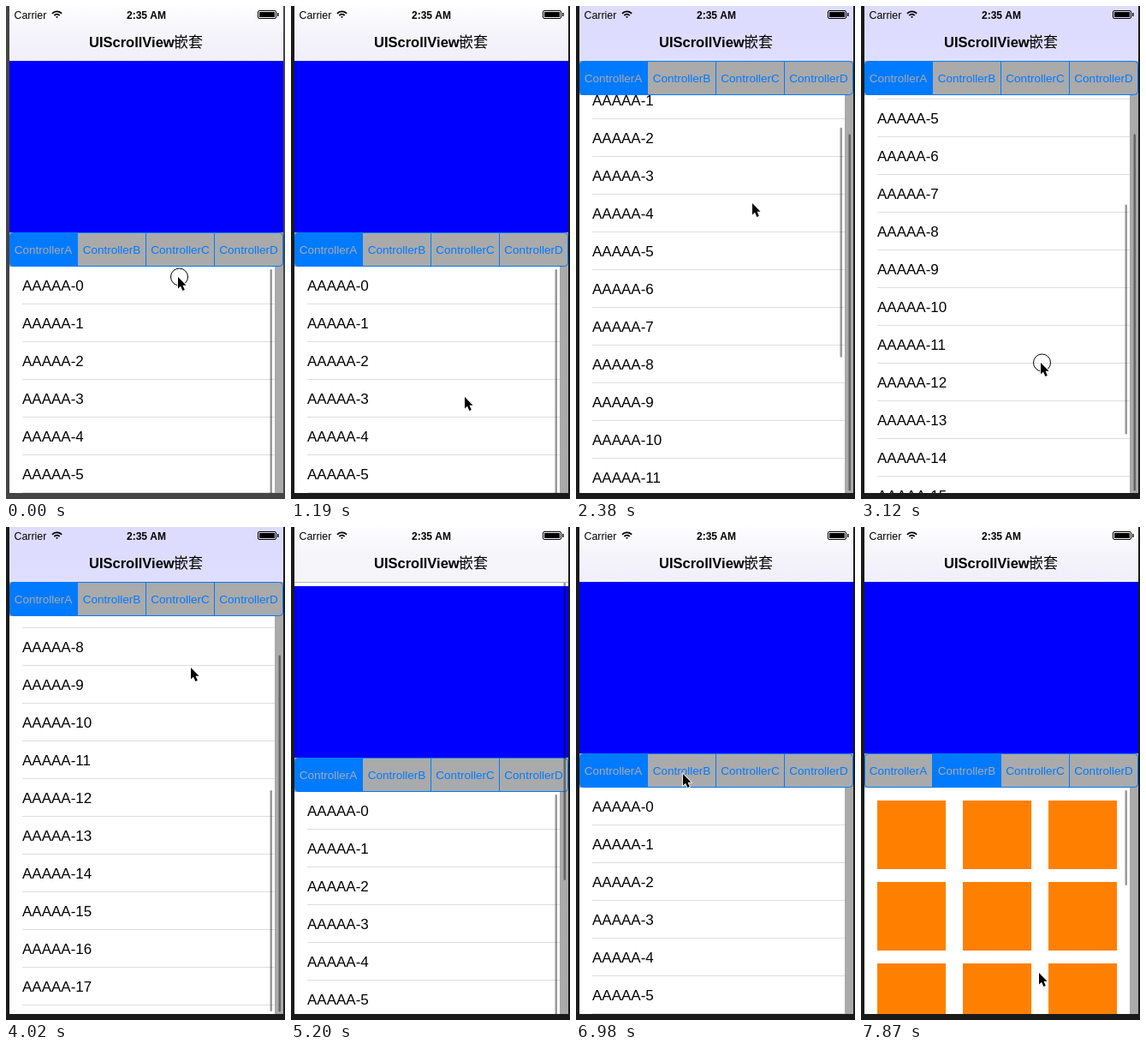
These frames come from a looping animation (326 px wide and 575 px high, 8000 ms). An HTML page with a canvas:

```html
<!DOCTYPE html>
<html lang="en">
<head>
<meta charset="utf-8">
<title>Nested scroll views</title>
<style>
  html, body { margin: 0; width: 100%; height: 100%; overflow: hidden; background: #1a1a1a; }
  canvas { display: block; }
</style>
</head>
<body>
<canvas id="stage" width="326" height="575"></canvas>
<script>
const ctx = document.getElementById('stage').getContext('2d');
const LOOP = 8000, STEP = 148.3;
const SANS = '"Liberation Sans", Arial, sans-serif';
const TINT = '#007aff', GRAY = '#aaa';
const LEFT = 4, WIDTH = 320, BOTTOM = 568, NAV = 64, HEADER = 200, TABS = 40;
const ROW = 44, ROWS = 18, LIST_MAX = 328, TAB_SWITCH = 49;

const cursorTrack = [
  [0, 201, 316], [3, 202, 400], [7, 203, 455], [9, 203, 457], [12, 202, 350],
  [14, 204, 257], [16, 206, 230], [19, 210, 525], [21, 210, 416], [25, 216, 170],
  [27, 216, 164], [29, 216, 180], [33, 214, 540], [35, 212, 590], [37, 208, 590],
  [41, 193, 400], [47, 125, 288], [49, 125, 284], [53, 208, 520]
];
const outerTrack = [
  [9, 0], [12, 107], [14.5, 200], [32, 200], [35, -5], [36, -28],
  [37, -18], [38, -8], [39, -3], [40, -1], [41, 0]
];
const innerTrack = [
  [14.5, 0], [16, 60], [18, 100], [19, 100], [21, 215], [23, 328], [25, 370],
  [26, 350], [27, 338], [28, 330], [29, 328], [32, 0]
];
const pressSpans = [[0, 3], [9, 16], [19, 25], [29, 33]];

const clamp = (v, lo = 0, hi = 1) => Math.min(hi, Math.max(lo, v));

function sample(track, step) {
  const next = track.findIndex(key => key[0] > step);
  if (next === 0) return track[0].slice(1);
  if (next < 0) return track[track.length - 1].slice(1);
  const a = track[next - 1], b = track[next];
  const k = (step - a[0]) / (b[0] - a[0]);
  return a.slice(1).map((v, i) => v + (b[i + 1] - v) * k);
}

function rect(x, y, w, h, color) {
  ctx.fillStyle = color;
  ctx.fillRect(x, y, w, h);
}

function text(str, x, y, font, color = '#000', align = 'left') {
  ctx.font = font;
  ctx.fillStyle = color;
  ctx.textAlign = align;
  ctx.fillText(str, x, y);
}

function indicator(x, top, bottom, alpha) {
  if (alpha <= 0) return;
  ctx.fillStyle = `rgba(0,0,0,${0.4 * alpha})`;
  ctx.beginPath();
  ctx.roundRect(x, top, 2.5, bottom - top, 1.25);
  ctx.fill();
}

function clipped(x, y, w, h, draw) {
  ctx.save();
  ctx.beginPath();
  ctx.rect(x, y, w, h);
  ctx.clip();
  draw();
  ctx.restore();
}

function drawList(top, offset) {
  for (let i = 0; i < ROWS; i++) {
    const y = top + i * ROW - offset;
    text('AAAAA-' + i, 19, y + 28, '17px ' + SANS);
    rect(19, Math.round(y) + ROW - 1, 295, 1, '#dedee0');
  }
}

function drawGrid(top) {
  for (let i = 0; i < 9; i++)
    rect(19 + i % 3 * 100, top + 15 + Math.floor(i / 3) * 95, 80, 80, '#ff8000');
}

function drawTabs(y, selected) {
  rect(LEFT, y, WIDTH, TABS, GRAY);
  ctx.save();
  ctx.beginPath();
  ctx.roundRect(LEFT + 0.5, y + 0.5, WIDTH - 1, TABS - 1, 4);
  ctx.save();
  ctx.clip();
  rect(LEFT + selected * 80 - (selected ? 1 : 0), y, selected ? 81 : 80, TABS, TINT);
  for (let i = 1; i < 4; i++) rect(LEFT + i * 80 - 1, y, 1, TABS, TINT);
  ctx.restore();
  ctx.strokeStyle = TINT;
  ctx.lineWidth = 1;
  ctx.stroke();
  ctx.restore();
  [...'ABCD'].forEach((letter, i) =>
    text('Controller' + letter, 43.5 + i * 80, y + 25, '13.5px ' + SANS,
      i === selected ? GRAY : TINT, 'center'));
}

function drawStatus() {
  text('Carrier', 9.5, 15, '12.4px ' + SANS);
  text('2:35 AM', 164, 15, 'bold 12px ' + SANS, '#000', 'center');
  ctx.strokeStyle = '#000';
  ctx.lineWidth = 1.8;
  for (const r of [1, 4.3, 7.6]) {
    ctx.beginPath();
    ctx.arc(59.5, 14, r, -Math.PI * 0.76, -Math.PI * 0.24);
    ctx.stroke();
  }
  ctx.lineWidth = 1;
  ctx.beginPath();
  ctx.roundRect(294.5, 5.5, 21, 9, 1.5);
  ctx.stroke();
  rect(296, 7, 18, 6, '#000');
  rect(317, 8, 1.5, 4, '#000');
}

function drawNav(outer) {
  const k = clamp(outer / 64);
  const mix = (a, b) => `rgb(${a.map((v, i) => v + (b[i] - v) * k)})`;
  const fill = ctx.createLinearGradient(0, 0, 0, NAV);
  fill.addColorStop(0, mix([254, 254, 255], [221, 220, 255]));
  fill.addColorStop(0.45, mix([246, 245, 250], [221, 220, 254]));
  fill.addColorStop(1, outer < 0 ? '#f5f4f9' : mix([240, 239, 251], [223, 222, 255]));
  rect(LEFT, 0, WIDTH, NAV, fill);
  if (outer < 0) rect(LEFT, NAV, WIDTH, 1, '#b4b4b8');
  drawStatus();
  text('UIScrollView', 97, 48, 'bold 16.5px ' + SANS);
  text('嵌套', 196, 48, '17px "Noto Sans CJK SC", "Noto Sans CJK", sans-serif');
}

function drawCursor(x, y, pressed) {
  if (pressed) {
    ctx.strokeStyle = '#000';
    ctx.lineWidth = 1;
    ctx.beginPath();
    ctx.arc(x + 1.5, y, 10, 0, 7);
    ctx.stroke();
  }
  ctx.save();
  ctx.translate(x, y);
  const arrow = new Path2D('M0 0V13.5L3 10.8L5.4 16L7.8 15L5.5 9.8H9.5Z');
  ctx.strokeStyle = '#fff';
  ctx.lineWidth = 1.6;
  ctx.stroke(arrow);
  ctx.fillStyle = '#000';
  ctx.fill(arrow);
  ctx.restore();
}

function draw(step) {
  const [outer] = sample(outerTrack, step);
  const [inner] = sample(innerTrack, step);
  const [cursorX, cursorY] = sample(cursorTrack, step);
  const tabsY = Math.round(NAV + HEADER - outer), listY = tabsY + TABS;
  const selected = step >= TAB_SWITCH ? 1 : 0;
  const fade = clamp((41 - step) / 3);

  rect(0, 0, 326, 575, step < 1 ? '#444' : '#1a1a1a');
  clipped(LEFT, 0, WIDTH, BOTTOM, () => {
    rect(LEFT, 0, WIDTH, BOTTOM, '#fff');
    rect(LEFT, tabsY - HEADER, WIDTH, HEADER, '#00f');
    rect(LEFT, listY, WIDTH, BOTTOM - listY, GRAY);
    drawTabs(tabsY, selected);

    clipped(LEFT, listY, 310, BOTTOM - listY, () => {
      rect(LEFT, listY, 310, BOTTOM, '#fff');
      if (selected) {
        drawGrid(listY);
        indicator(308.5, listY + 3, listY + 114, 1);
      } else {
        drawList(listY, inner);
        const top = listY + 3 + 190 * Math.min(inner, LIST_MAX) / LIST_MAX;
        const squeeze = Math.max(0, inner - LIST_MAX);
        indicator(308.5, top + squeeze, top + 268, fade);
      }
    });

    const top = 1 + 0.742 * Math.max(0, outer);
    indicator(318.5, top, top + 416 + Math.min(0, outer), step < 9 ? 0 : fade);
    drawNav(outer);
    drawCursor(cursorX, cursorY, pressSpans.some(([a, b]) => step >= a && step < b));
  });
}

function tick() {
  draw(Math.floor(performance.now() % LOOP / STEP));
  requestAnimationFrame(tick);
}
tick();
</script>
</body>
</html>
```
